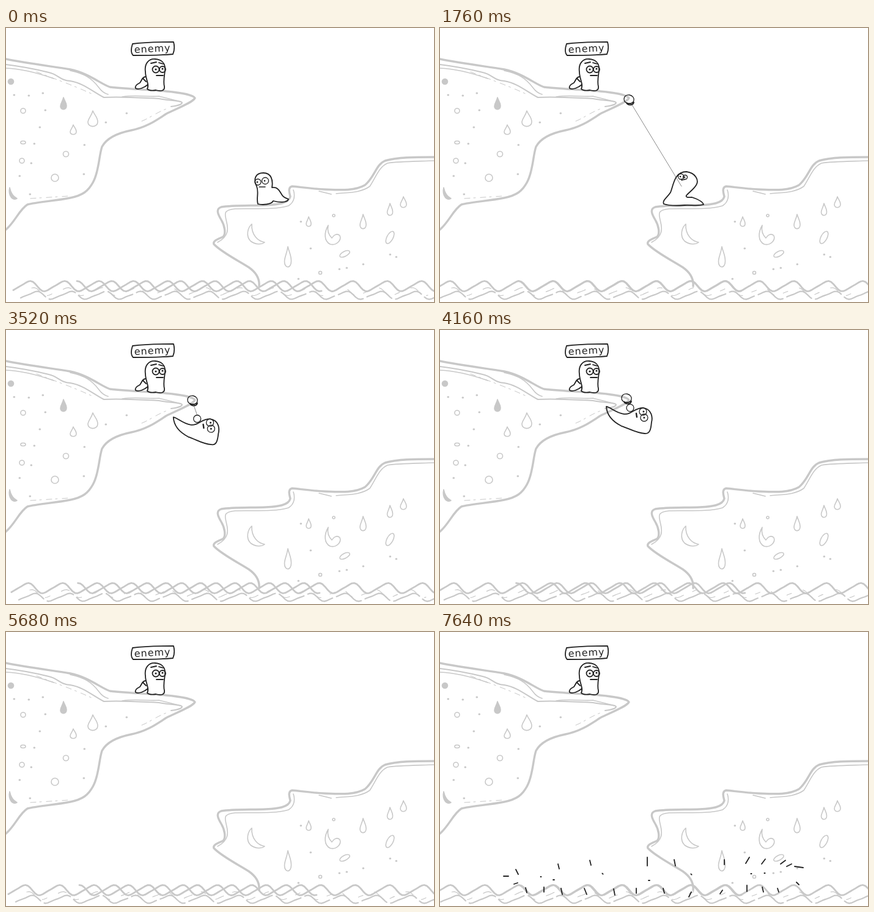
These frames come from a looping animation (700 px wide and 450 px high, 7680 ms). An HTML page:

```html
<!DOCTYPE html>
<html lang="en">
<head>
<meta charset="utf-8">
<title>Two ledges</title>
<style>
  html, body { margin: 0; width: 100%; height: 100%; overflow: hidden; background: #fff; }
  svg { display: block; width: 700px; height: 450px; }
  path, circle, ellipse { fill: none; stroke-linecap: round; stroke-linejoin: round; }
  .land { stroke: #c8c8c8; stroke-width: 1.6; }
  .edge { stroke-width: 3.4; }
  .land .full, .land .dots { fill: #c8c8c8; }
  .ink { stroke: #222; stroke-width: 1.8; }
  .ink .solid { fill: #fff; }
  .ink .dot { fill: #222; stroke: none; }
  .thin { stroke-width: 1.3; }
  text { font: 16px "DejaVu Sans", sans-serif; letter-spacing: 1px; fill: #222; stroke: none; }
</style>
</head>
<body>
<svg viewBox="0 0 700 450">
  <g class="land">
    <path class="edge" d="M0 51C30 57 60 61 105 68C135 74 155 92 170 97C200 100 240 102 262 104C285 106 306 110 309 115C306 122 280 132 262 141C245 152 230 163 205 168C185 172 165 180 157 195C152 210 152 235 143 252C135 268 125 275 105 279C80 284 50 286 35 290C22 298 15 318 0 331"/>
    <path d="M0 60C25 63 50 68 70 73C85 76 88 86 105 87C125 90 140 103 160 114C190 112 225 115 250 116C270 120 288 119 288 123C286 127 278 128 270 129" stroke-width="2"/>
    <path d="M0 66C30 67 58 76 78 83M105 70C128 75 140 82 152 98C157 105 163 108 167 109M190 113C215 109 235 114 250 112C265 116 276 118 285 121"/>
    <path d="M50 72C75 82 105 92 140 108M222 153C235 148 250 136 268 131M40 280L103 276" stroke-dasharray="9 6 3 8" stroke-width="1"/>
    <path class="edge" d="M700 212C670 212 640 212 620 218C605 224 603 245 587 258C570 268 545 266 520 265C500 264 480 261 468 260C460 262 464 272 465 277C462 288 445 290 425 291C400 292 370 291 352 294C343 297 346 305 352 315C358 325 360 338 355 343C345 347 338 350 340 355C352 368 380 382 397 393C410 402 415 412 414 424"/>
    <path d="M700 218C670 219 640 219 624 222C610 228 605 245 595 260C580 271 560 270 540 272M532 273L512 268M470 266C473 275 472 286 462 292C440 299 400 296 375 297C355 299 358 305 360 315C364 330 365 342 346 352"/>
    <g id="drops"></g>
    <path class="full" d="M6 262C8 272 12 277 18 280C11 284 3 276 6 262Z"/>
    <path d="M402 322C395 328 392 342 400 350C408 356 418 356 423 352C412 350 401 340 402 322Z"/>
    <path d="M527 324C520 336 520 350 530 355C541 358 549 348 546 341C541 336 535 341 533 345C528 340 525 333 527 324Z"/>
    <ellipse cx="628" cy="344" rx="5" ry="11" transform="rotate(28 628 344)"/>
    <ellipse cx="554" cy="371" rx="9" ry="4" transform="rotate(-28 554 371)"/>
    <ellipse cx="28" cy="188" rx="4" ry="2.5"/>
    <circle class="full" cx="8" cy="88" r="4.5"/>
    <path id="specks" stroke-width="3"/>
    <path id="seaLeft" stroke-width="2.8"/>
    <path id="seaRight" stroke-width="2.8"/>
    <path id="seaLow" stroke-width="2.2" stroke-dasharray="46 7"/>
    <path id="seaMid" stroke-width="1.2" stroke-dasharray="14 16 8 20"/>
  </g>

  <g class="ink">
    <path class="solid" d="M207 26C230 23 255 23 274 23C276 30 275 38 273 43C250 45 225 45 208 45C203 40 205 32 207 26Z"/>
    <text x="210" y="41" transform="rotate(-3 210 41)">enemy</text>
    <path class="solid" d="M229 80C223 80 222 86 219 90C215 92 210 95 212 99C217 102 226 98 232 93"/>
    <path class="solid" d="M231 100C235 92 228 84 228 72C226 58 234 50 244 51C256 52 261 58 260 70C259 78 257 88 259 96C260 104 252 104 245 102C239 103 234 103 231 100Z"/>
    <path d="M237 58L246 56M250 57L257 59M246 78L257 78M224 83L229 88"/>
    <g id="awake">
      <circle cx="245" cy="68" r="5.5"/><circle cx="256" cy="68" r="5"/>
      <circle class="dot" cx="245" cy="68" r="1.6"/><circle class="dot" cx="256" cy="67" r="1.6"/>
    </g>
    <path id="blink" d="M240 68L250 68M252 68L261 68"/>
  </g>

  <path id="rope" stroke="#888"/>
  <g class="ink">
    <path id="slug"/>
    <path id="face" class="thin"/>
    <g id="hanger">
      <path d="M-39 -2C-32 -1 -24 8 -11 10C2 12 6 0 21 0C36 2 37 16 35 24C34 36 32 43 24 42C9 41 -1 34 -14 30C-26 24 -38 14 -39 -2Z"/>
      <circle class="thin" cx="21" cy="6" r="6"/><circle class="thin" cx="23" cy="16" r="6"/>
      <circle class="dot" cx="22" cy="6" r="1.5"/><circle class="dot" cx="23" cy="16" r="1.5"/>
      <path d="M10 9L11 15" stroke-width="2.4"/>
      <circle class="thin" r="6"/>
    </g>
    <g id="hand">
      <path class="thin" d="M-8 -1C-8 -6 -4 -9 1 -8C6 -7 9 -3 8 1C7 5 3 7 -1 6C-5 5 -8 3 -8 -1Z"/>
      <path d="M-4 5C-1 10 7 9 8 4C4 6 0 7 -4 5Z"/>
    </g>
    <path id="splash"/>
  </g>
</svg>
<script>
const LOOP = 7680, STEP = 40, TAU = Math.PI * 2;
const el = id => document.getElementById(id);
const draw = (id, d) => el(id).setAttribute('d', d);
const place = (id, x, y, turn = 0) => el(id).setAttribute('transform', `translate(${x} ${y}) rotate(${turn})`);
const show = (id, on) => { el(id).style.display = on ? '' : 'none'; };
const lerp = (a, b, k) => a + (b - a) * k;
const span = (t, a, b) => Math.min(1, Math.max(0, (t - a) / (b - a)));
const smooth = k => k * k * (3 - 2 * k);

// Pebbles: x, y, half width, half height, filled
const drop = ([x, y, w, h, full]) =>
  `<path ${full ? 'class="full"' : ''} d="M${x} ${y - h}C${x - w * .3} ${y - h * .3} ${x - w} ${y} ${x - w} ${y + h * .45}` +
  `C${x - w} ${y + h * 1.15} ${x + w} ${y + h * 1.15} ${x + w} ${y + h * .4}C${x + w} ${y - h * .2} ${x + w * .3} ${y - h * .5} ${x} ${y - h}Z"/>`;
const ring = ([x, y, r]) => `<circle cx="${x}" cy="${y}" r="${r}"/>`;
el('drops').innerHTML =
  [[94, 124, 5, 10, 1], [142, 149, 8, 13], [110, 167, 5, 8], [495, 318, 4, 8], [584, 318, 5, 12],
   [628, 298, 4.5, 10], [650, 286, 5, 9], [461, 376, 5.5, 17]].map(drop).join('') +
  [[98, 207, 4.5], [80, 246, 6], [26, 218, 4], [28, 136, 4], [514, 402, 2.5], [536, 308, 2]].map(ring).join('');
draw('specks', [[37, 111], [60, 107], [64, 135], [13, 110], [46, 190], [128, 192], [127, 240], [41, 222],
  [39, 273], [197, 140], [163, 155], [55, 163], [22, 243], [498, 362], [545, 396], [557, 394], [584, 388],
  [482, 318], [628, 372], [638, 376], [478, 412]].map(([x, y]) => `M${x} ${y}h.6`).join(''));

// Slug poses share one structure so they can blend
const eye = (x, y, r) => `M${x - r} ${y}a${r} ${r} 0 1 0 ${2 * r} 0a${r} ${r} 0 1 0 ${-2 * r} 0`;
const eyes = (x1, y1, r1, x2, y2, r2) =>
  eye(x1, y1, r1) + eye(x2, y2, r2) + eye(x1 - 1, y1, .7) + eye(x2 - 1, y2, .7);
const sit = {
  body: 'M412 289C409 280 414 270 410 260C404 248 408 238 421 238C434 238 437 250 435 262C437 262 441 261 444 264C448 267 449 271 452 275C454 278 459 280 462 281C460 288 445 286 437 284C434 290 420 291 412 289Z',
  face: eyes(412, 253, 5, 424, 251, 5.5) + 'M414 261L424 261'
};
const crouch = {
  body: 'M372 293C368 287 377 280 376 273C366 262 362 245 380 243C396 244 399 256 397 265C398 261 404 260 407 267C411 259 415 264 418 275C422 285 427 294 424 297C418 298 405 288 400 290C395 295 380 295 372 293Z',
  face: eyes(372, 255, 5.5, 385, 254, 6) + 'M374 265L383 267'
};
const reach = {
  body: 'M366 289C363 283 372 278 377 270C382 258 383 236 403 236C418 238 424 250 419 258C414 266 408 269 403 275C401 279 408 278 412 278C421 281 430 285 431 290C420 293 410 290 400 291C388 292 375 292 366 289Z',
  face: eyes(394, 244, 4.5, 401, 245, 3.5) + 'M395 250L403 248'
};
const NUM = /-?\d+(\.\d+)?/g;
const mix = (a, b, k) => {
  const to = b.match(NUM);
  let i = 0;
  return a.replace(NUM, n => +lerp(+n, +to[i++], k).toFixed(2));
};

function wave(from, to, crest, y, size) {
  let d = '';
  for (let x = from; x <= to; x += 4) {
    const a = TAU * (x - crest) / 56.3;
    d += `${d ? 'L' : 'M'}${x.toFixed(1)} ${(y - size * Math.cos(a) - 1.5 * Math.sin(a * 2)).toFixed(1)}`;
  }
  return d;
}

function sea(t) {
  const off = 12 * Math.cos(TAU * t / 3150);
  draw('seaLeft', wave(off, 506 + off, 25 + off, 424, 8));
  draw('seaRight', wave(122 - off / 2, 712, 120 - off / 2, 424, 8));
  draw('seaLow', wave(12 + off, 712, 36 + off, 439, 6));
  draw('seaMid', wave(30 + off, 690, 30 + off, 433, 6));
}

const LEAP = 1850, DROP = 4880, SUNK = 5600;

function slug(t) {
  const onLand = t < LEAP, hanging = !onLand && t < SUNK;
  show('slug', onLand);
  show('face', onLand);
  show('hanger', hanging);
  const cast = t >= 1400 && t < SUNK;
  show('hand', cast);
  show('rope', cast);

  let ball = [395, 260], hand = [309, 118];
  if (onLand) {
    const [a, b, k] = t < 1150 ? [sit, crouch, span(t, 0, 960)] : [crouch, reach, smooth(span(t, 1150, 1400))];
    draw('slug', mix(a.body, b.body, k));
    draw('face', mix(a.face, b.face, k));
    const fly = span(t, 1400, 1600);
    hand = [lerp(395, 309, fly), lerp(260, 118, fly)];
  } else if (hanging) {
    const age = t - LEAP, pull = span(t, LEAP, 2880);
    const length = t < 2880 ? lerp(165, 46, 1 - (1 - pull) ** 2) : lerp(46, 15, span(t, 2880, 4160));
    const swing = 23 * Math.exp(-age / 700) * Math.cos(TAU * age / 1000);
    const angle = (8 + swing) * Math.PI / 180;
    const fallen = .0007 * Math.max(0, t - DROP) ** 2;
    const climb = span(t, 2880, 4160);
    hand = [lerp(309, 305, pull), lerp(lerp(118, 119, pull), 113, climb) + fallen];
    ball = [309 + length * Math.sin(angle), 118 + length * Math.cos(angle) + fallen - 5 * climb];
    place('hanger', ball[0], ball[1], -swing);
  }
  place('hand', hand[0], hand[1]);
  const dx = ball[0] - hand[0], dy = ball[1] - hand[1], gap = Math.hypot(dx, dy) || 1;
  const start = Math.min(8 / gap, 1);
  draw('rope', `M${hand[0] + dx * start} ${hand[1] + dy * start}L${ball[0]} ${ball[1] - (hanging ? 6 : 0)}`);
}

// Spray: landing x, y and half stroke
const spray = [
  [108, 401, 4, 0], [126, 394, 2, 4], [124, 413, 3, -1], [165, 402, .5, 0], [186, 407, 1, 0], [194, 385, 1, 4],
  [246, 379, 1, 4], [266, 397, .6, .6], [339, 377, 0, 7], [342, 408, 1, 0], [384, 379, 1, 5], [411, 398, .6, .6],
  [465, 378, 0, 4], [503, 375, 3, -5], [509, 397, .6, 0], [529, 377, 3, -4], [531, 396, .6, 0], [561, 378, 4, -3],
  [571, 383, 4, -2], [587, 386, 7, 1], [141, 424, 1, 4], [170, 423, 0, 4], [199, 426, 1, 5], [238, 426, 2, 5],
  [285, 427, 1, 5], [321, 425, 0, 4], [366, 425, 1, 4], [409, 431, 2, -4], [460, 427, 2, -3], [502, 421, 0, 5],
  [528, 423, 1, 4], [553, 424, 1, 3], [585, 413, 2, 2]
];

function splash(t) {
  const age = t - 5700, life = 1940;
  show('splash', age > 0);
  if (age <= 0) return;
  const rise = .00063 * age * (life - age), spread = age / life;
  draw('splash', spray.map(([x, y, w, h]) =>
    `M${lerp(345, x, spread) - w} ${y - rise - h}l${2 * w} ${2 * h}`).join(''));
}

function enemy(t) {
  const shut = [2560, 3680, 4520, 6800].some(at => t >= at && t < at + 120);
  show('awake', !shut);
  show('blink', shut);
}

function frame() {
  const t = Math.floor(performance.now() % LOOP / STEP) * STEP;
  sea(t);
  slug(t);
  splash(t);
  enemy(t);
  requestAnimationFrame(frame);
}
frame();
</script>
</body>
</html>
```
